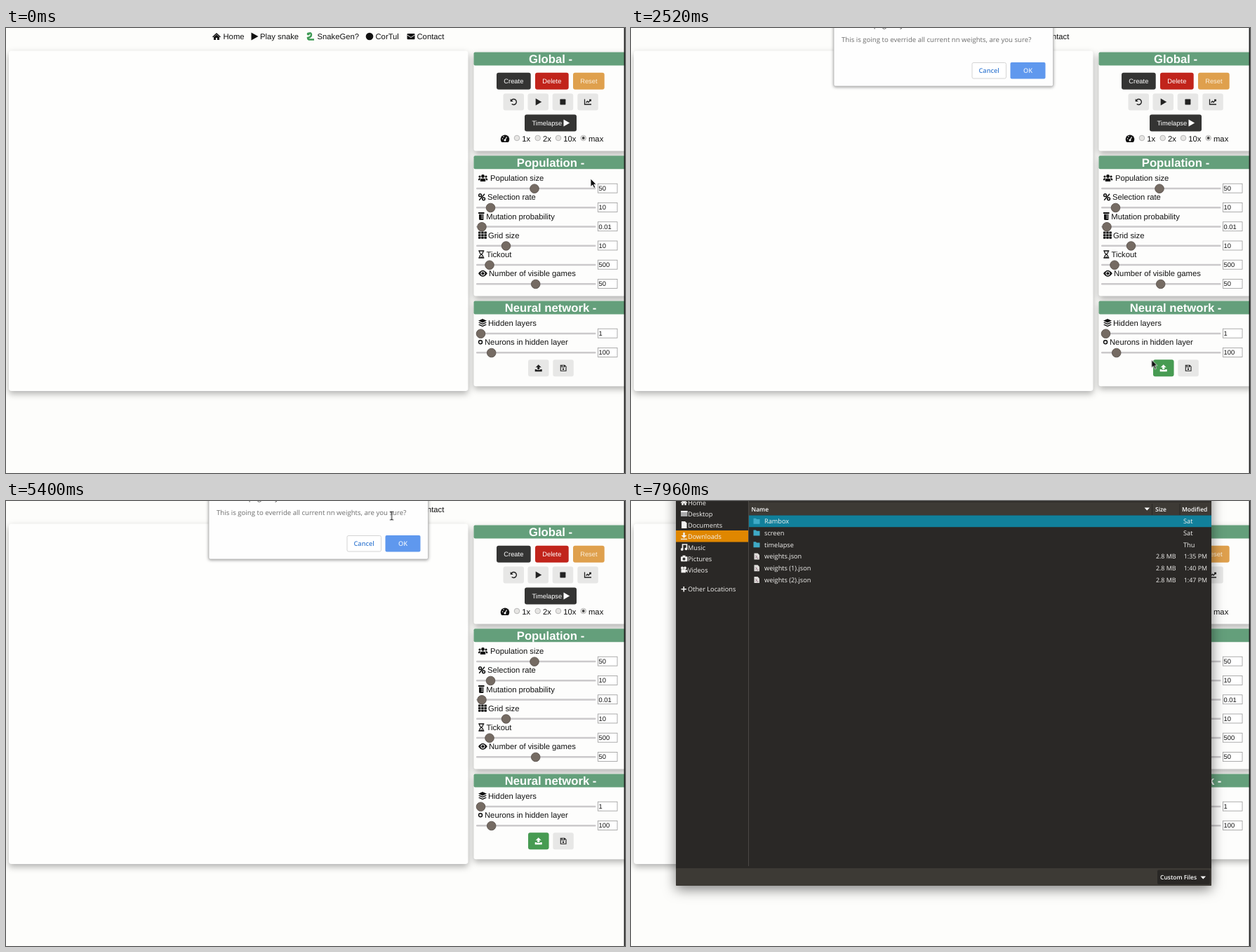
Write an HTML page that moves like this. It is 882 px wide and 635 px high and loops after 8 s.

```html
<!DOCTYPE html>
<html lang="en">
<head>
<meta charset="utf-8">
<title>Snake trainer</title>
<style>
html, body { margin: 0; width: 100%; height: 100%; overflow: hidden; background: #fdfdfb; }
svg { display: block; width: 882px; height: 635px; }
text { font: 11.25px "Liberation Sans", Arial, sans-serif; fill: #111; white-space: pre; text-rendering: geometricPrecision; }
.title { font-size: 16.7px; font-weight: bold; fill: #fff; text-anchor: middle; }
.small { font-size: 9.33px; }
.ui { font-family: "Open Sans", "Noto Sans", sans-serif; font-size: 9.2px; fill: #f3f2f0; }
.bold { font-size: 8.5px; font-weight: 600; fill: #fff; }
.mid { text-anchor: middle; }
.end { text-anchor: end; }
.panel { filter: drop-shadow(0 4px 5px rgba(0,0,0,.3)); }
#files { filter: drop-shadow(0 5px 9px rgba(0,0,0,.5)); }
</style>
</head>
<body>
<svg id="stage" viewBox="0 0 882 635">
  <g id="page"></g>
  <g id="hover"></g>
  <g id="confirm"></g>
  <g id="pointer">
    <path id="arrow" d="M0 0v11.5l2.8-2.5 2 4.4 2-.9-2-4.3h3.4z" fill="#111" stroke="#fff" stroke-width=".8"/>
    <path id="hand" d="M-1.5-1.5q1.4-1 2.4 0v4l5 1.1q1.3.5 1.2 2l-.7 4H-.5L-4 5q.8-1.2 2.5.2z" fill="#111" stroke="#fff" stroke-width=".8"/>
    <path id="beam" d="M-2.5-6q2 0 2.5 1.2Q.5-6 2.5-6M0-5V5M-2.5 6Q-.5 6 0 4.8.5 6 2.5 6" fill="none" stroke="#222" stroke-width="1.1"/>
  </g>
  <g id="files"></g>
  <path d="M881.3 0V635" stroke="#1c1c1c" stroke-width="1.4"/>
</svg>
<script>
const LOOP = 8000;
const $ = id => document.getElementById(id);

const rect = (x, y, w, h, fill, rx = 0, more = '') =>
  `<rect x="${x}" y="${y}" width="${w}" height="${h}" rx="${rx}" fill="${fill}" ${more}/>`;
const text = (x, y, label, cls = '', more = '') =>
  `<text x="${x}" y="${y}" class="${cls}" ${more}>${label}</text>`;
const icon = (d, fill = '#111', more = '') => `<path d="${d}" fill="${fill}" ${more}/>`;
const line = (d, stroke = '#111', width = 1.5) =>
  `<path d="${d}" fill="none" stroke="${stroke}" stroke-width="${width}"/>`;
const dot = (x, y, r, fill = '#111', more = '') =>
  `<circle cx="${x}" cy="${y}" r="${r}" fill="${fill}" ${more}/>`;
const at = (x, y, body) => `<g transform="translate(${x} ${y})">${body}</g>`;

function panel(y, h, title, titleX) {
  return `<g class="panel">${rect(666.5, y, 220, h, '#fdfdfc', 3)}</g>` +
    rect(666.5, y, 216, 19, '#649f7b', 2) + text(titleX, y + 15.2, title, 'title');
}

function slider(y, label, labelX, thumbX, value, glyph) {
  return at(673, y, glyph) + text(labelX, y + 4, label) +
    rect(670, y + 13.8, 170.5, 2.4, '#cbc9cb', 1.2) +
    dot(thumbX, y + 15.2, 6.3, '#756b63', 'stroke="#514a45" stroke-width=".8"') +
    rect(843.5, y + 8.2, 27.5, 13, '#fff', 0, 'stroke="#999" stroke-width=".8"') +
    text(844.6, y + 18, value, 'small');
}

function button(x, y, w, label, fill, color = '#fff') {
  return rect(x, y, w, 24, fill, 3) +
    text(x + w / 2, y + 15.2, label, 'small mid', `style="fill:${color}"`);
}

const iconButton = (x, y, glyph, fill = '#e7e7e6') =>
  rect(x, y, 29.5, 24, fill, 3) + at(x + 14.7, y + 12, glyph);

const upload = color => icon('M0-5L4-1H1.5v3h-3v-3H-4zM-5 1.8h2.5v1h5v-1H5V5H-5z', color);

const homeGlyph = 'M-6 .5L0-5 6 .5l-1 1-5-4.5-5 4.5zM-4 1l4-3.5L4 1v4H1V2h-2v3h-3z';

const glyphs = {
  people: dot(6.5, -2.5, 2.4) + dot(2, -2, 1.6) + dot(11, -2, 1.6) +
    icon('M2.8 5V2.5Q3 .5 6.5.5T10.2 2.5V5zM0 3.2V1.5Q1 .2 3.2.4L2 3.2zM13.2 3.2V1.5Q12.2.2 10 .4l1.2 2.8z'),
  percent: line('M1.2 4.5L9-4.5') +
    dot(2.6, -2.6, 1.9, 'none', 'stroke="#111" stroke-width="1.5"') +
    dot(7.6, 2.6, 1.9, 'none', 'stroke="#111" stroke-width="1.5"'),
  tube: icon('M0-5.5h8.5v2H0zM1-2.7h6.6V4q0 1.5-1.5 1.5H2.5Q1 5.5 1 4z') + line('M4-1.3h3.6M4 .8h3.6M4 2.9h3.6', '#fff', .7),
  grid: [0, 1, 2].flatMap(r => [0, 1, 2].map(c => rect(c * 4.2, r * 3.6 - 5.2, 3.5, 3, '#111', .4))).join(''),
  glass: line('M.3-5h8M.3 5h8') + line('M1.5-5Q1.5-1.5 4.3 0 7-1.5 7-5M1.5 5Q1.5 1.5 4.3 0 7 1.5 7 5', '#111', 1.2) + icon('M2.5 4.5q1.8-3 3.6 0z'),
  eye: icon('M0 0Q6.3-9 12.8 0 6.3 9 0 0z') + dot(6.4, 0, 3, '#fff') + dot(6.4, 0, 2),
  layers: icon('M6-6l6 2.7L6-.6 0-3.3zM0-.4l1.8-.8L6 .7l4.2-1.9 1.8.8L6 2.3zM0 2.6l1.8-.8L6 3.7l4.2-1.9 1.8.8L6 5.3z'),
  ring: dot(3, 0, 2.5, 'none', 'stroke="#111" stroke-width="1.5"')
};

function drawPage() {
  const nav = at(300, 12, icon(homeGlyph)) + text(309.5, 16, 'Home') +
    icon('M349.5 6.5l10 5.5-10 5.5z') + text(362, 16, 'Play snake') +
    line('M431 8q4-2 4 1.5T430 14q0 3 4 2.5h5', '#3f9a55', 2.5) + dot(430.7, 8.5, 2, '#3f9a55') +
    text(443.5, 16, 'SnakeGen?') +
    dot(518, 12, 5.3) + text(526.5, 16, 'CorTul') +
    rect(571.5, 8, 11, 8.3, '#111', 1) + line('M571.5 10l5.5 3.5L582.5 10', '#fff', .9) +
    text(585.5, 16, 'Contact');

  const radios = [[728, '1x'], [757.7, '2x'], [787, '10x'], [822.7, 'max']].map(([x, label]) =>
    dot(x, 157, 3.8, '#e6e5e3', 'stroke="#aaa" stroke-width=".8"') +
    (label === 'max' ? dot(x, 157, 1.9, '#444') : '') + text(x + 7.3, 161.5, label)).join('');

  const global = panel(34.5, 141, 'Global -', 776) +
    button(699, 63.7, 48.7, 'Create', '#343433') +
    button(754, 63.7, 47.7, 'Delete', '#c1241b') +
    button(808, 63.7, 44.7, 'Reset', '#dfa04d', '#fbeedb') +
    iconButton(708.5, 93.5, line('M-3-2.5A4 4 0 1 1-2.5 3', '#222', 1.4) + icon('M-4.5-4.5v4h4z', '#222')) +
    iconButton(743.5, 93.5, icon('M-3.5-5L5 0-3.5 5z', '#222')) +
    iconButton(778.7, 93.5, rect(-4, -4, 8, 8, '#222', .7)) +
    iconButton(814.3, 93.5, line('M-4.5-4V3.5H5M-2.5 1L-.5-1 1 .5 4-2.7M2-3h2.3v2', '#222', 1.3)) +
    rect(739, 123.5, 74, 24, '#343433', 3) + text(749.5, 138.7, 'Timelapse', 'small', 'style="fill:#fff"') +
    icon('M794.5 130.5l8.7 5-8.7 5z', '#fff') +
    icon('M706.3 163A6.3 6.3 0 1 1 715.7 163z') + line('M711 160l2.5-4.5', '#fff', 1.2) +
    dot(711, 160, 1.5, '#fff') + dot(707.5, 158, .8, '#fff') + dot(709, 155, .8, '#fff') + radios;

  const rows = [
    ['Population size', 690, 753, '50', 'people'],
    ['Selection rate', 686, 690.5, '10', 'percent'],
    ['Mutation probability', 684.3, 678, '0.01', 'tube'],
    ['Grid size', 687, 712.5, '10', 'grid'],
    ['Tickout', 684.5, 689, '500', 'glass'],
    ['Number of visible games', 688, 754.7, '50', 'eye']
  ];
  const population = panel(182.3, 200.2, 'Population -', 776) +
    rows.map(([label, x, thumb, value, g], i) => slider(214 + 27.25 * i, label, x, thumb, value, glyphs[g])).join('');

  const network = panel(389.6, 121.7, 'Neural network -', 776) +
    slider(421, 'Hidden layers', 687, 676.5, '1', glyphs.layers) +
    slider(448.3, 'Neurons in hidden layer', 682, 691.7, '100', glyphs.ring) +
    iconButton(744, 473.3, upload('#222')) +
    iconButton(779.3, 473.3, line('M-3.7-4H2L4-2V4H-3.7zM-2-4v2.5h3.5V-4', '#222', 1.1) + dot(0, 1.5, 1.2, '#222'));

  $('page').innerHTML = rect(0, 0, 882, 635, '#fdfdfb') + nav +
    `<g class="panel">${rect(4, 32.5, 654.5, 485.5, '#fefefd', 4)}</g>` + global + population + network;
  $('hover').innerHTML = iconButton(744, 473.3, upload('#fff'), '#479b52');
}

function drawConfirm() {
  $('confirm').innerHTML =
    `<g style="filter:drop-shadow(0 1px 2px rgba(0,0,0,.4))">${rect(289, -50, 312.5, 133, '#fefefe', 2, 'stroke="#bbb" stroke-width=".8"')}</g>` +
    text(300, -1, 'This web page says', 'ui', 'style="fill:#333;font-size:10.5px"') +
    text(300, 19.5, 'This is going to everride all current nn weights, are you sure?', 'ui', 'style="fill:#6d6d6d;font-size:9.65px"') +
    rect(486, 49.5, 48.5, 22.5, '#fff', 2, 'stroke="#d4d4d4" stroke-width="1"') +
    text(510.2, 63.8, 'Cancel', 'ui mid', 'style="fill:#3d7fd3;font-weight:600"') +
    rect(540.5, 49, 50, 23.5, '#5f98ee', 2) +
    text(565.5, 63.8, 'OK', 'ui mid', 'style="fill:#e3edfc;font-weight:600"');
}

function drawFiles() {
  const white = '#f3f2f0';
  const places = [
    ['Recent', dot(0, 0, 3.7, 'none', `stroke="${white}" stroke-width="1.3"`) + line('M0-2V.5H2', white, 1)],
    ['Home', `<g transform="scale(.8)">${icon(homeGlyph, white)}</g>`],
    ['Desktop', rect(-4.5, -4, 9.5, 8, '#aaa') + rect(-4.5, -4, 9.5, 2, white)],
    ['Documents', icon('M-3.5-5H1.5L4-2.5V5h-7.5z', white)],
    ['Downloads', icon('M-1.2-5h2.4v4H4L0 3-4-1h2.8zM-4.5 3.7h9V5h-9z', white)],
    ['Music', line('M-2 3V-4H4V2', white, 1.7) + dot(-2.8, 3, 1.9, white) + dot(3, 2.3, 1.9, white)],
    ['Pictures', rect(-4.5, -2.8, 9.5, 7, white, 1) + rect(-2, -4.3, 4, 2, white) + dot(0, .7, 2, '#333')],
    ['Videos', dot(-2.5, -2.5, 2, white) + dot(1.5, -2.5, 2, white) + rect(-4, -.7, 6.5, 5, white) + icon('M2 1.5L5-.5v5z', white)]
  ];
  const entries = [
    ['Rambox', '', 'Sat'], ['screen', '', 'Sat'], ['timelapse', '', 'Thu'],
    ['weights.json', '2.8 MB', '1:35 PM'], ['weights (1).json', '2.8 MB', '1:40 PM'], ['weights (2).json', '2.8 MB', '1:47 PM']
  ];
  const folder = icon('M-4.5-4H-1l1 1.2h4.5V4h-9z', '#3faac6');
  const sheet = icon('M-3.5-4.5H1.5l2.5 2.5v6.5h-7.5z', '#deddda') + line('M-1.5-1l2 1.5-2 1.5M.5 2.5h2', '#8a5d75', .9);
  const bar = '#3d3a35';

  $('files').innerHTML = rect(64, -49.5, 763, 598.5, '#2a2826', 2) +
    rect(64, -49.5, 763, 24, bar, 2) +
    text(94, -33.8, 'Cancel', 'ui bold mid') + text(445, -33.8, 'Open File', 'ui bold mid') +
    text(796, -33.8, 'Open', 'ui bold mid') +
    dot(759.5, -38, 2.8, 'none', 'stroke="#fff" stroke-width="1.2"') + line('M761.5-36l3 3', '#fff') +
    rect(168, -25.5, 659, 27.5, '#302e2b') +
    icon('M182-15v6l-3.5-3zM314-15v6l3.5-3z', white) +
    at(197.5, -12, `<g transform="scale(.7)">${icon(homeGlyph, white)}</g>`) +
    text(204, -8.7, 'tavolendi/', 'ui bold') + text(252.5, -8.7, 'Downloads', 'ui bold') +
    rect(168, 2, 659, 18.5, bar) +
    text(171.5, 14.5, 'Name', 'ui bold') + text(747, 14.5, 'Size', 'ui bold') + text(785, 14.5, 'Modified', 'ui bold') +
    icon('M731.5 9.5h7.5l-3.75 4z', '#fff') + line('M742.5 4V20M782 4V20', '#2a2826', 1) +
    rect(168, 20.5, 659, 16.7, '#11809b') +
    line('M167.5-25V521', '#4b4845', 1) +
    `<g id="place">${rect(64, 42, 103, 16.5, '#e08700')}</g>` +
    places.map(([label, glyph], i) => {
      const y = -14 + 16 * i;
      return at(75.5, y, glyph) + text(81, y + 3.5, label, 'ui');
    }).join('') +
    line('M71.5 125.7h7.5M75.25 122v7.5', white, 1.6) + text(81, 129.2, 'Other Locations', 'ui') +
    entries.map(([name, size, date], i) => {
      const y = 28.8 + 16.75 * i;
      return at(179, y, size ? sheet : folder) + text(190, y + 3.4, name, 'ui') +
        text(776.5, y + 3.4, size, 'ui end', 'style="font-size:8.9px"') +
        (size ? text(821, y + 3.4, date, 'ui end', 'style="font-size:8.9px"') : text(787, y + 3.4, date, 'ui'));
    }).join('') +
    rect(64, 524, 763, 25, bar, 1) + rect(750, 526.5, 75, 20.5, '#292725', 2) +
    text(754, 540.3, 'Custom Files', 'ui bold') + icon('M811.5 535.5h7.5l-3.75 4z', '#fff');
}

function play(id, steps) {
  const first = steps[0][1], last = steps[steps.length - 1][1];
  const frames = [[0, first], ...steps, [LOOP, last]]
    .map(([t, style, easing = 'linear']) => ({ offset: t / LOOP, easing, ...style }));
  $(id).animate(frames, { duration: LOOP, iterations: Infinity }).startTime = 0;
}

// Visible only inside the given [from, to) spans.
function showDuring(id, ...spans) {
  const off = { opacity: 0 }, on = { opacity: 1 };
  const steps = spans.flatMap(([from, to]) => [[from, off], [from, on], [to, on], [to, off]]);
  play(id, spans[0][0] === 0 ? steps.slice(1) : steps);
}

drawPage();
drawConfirm();
drawFiles();

const move = (t, x, y) => [t, { transform: `translate(${x}px, ${y}px)` }, 'ease-in-out'];
play('pointer', [
  move(0, 833, 215), move(920, 838.5, 371), move(1720, 754, 486.5), move(2440, 754, 486.5),
  move(3120, 316, 22), move(3480, 316, 22), move(5400, 549.5, 21), move(5840, 566, 60)
]);
showDuring('arrow', [0, 1680], [2480, 3000], [5560, 6360]);
showDuring('hand', [1680, 2480]);
showDuring('beam', [3000, 5560]);

play('hover', [
  [1660, { opacity: 0 }], [1840, { opacity: 1 }],
  [6380, { opacity: 1 }], [6560, { opacity: 0 }]
]);

const slide = (t, y, opacity) => [t, { transform: `translateY(${y}px)`, opacity }];
play('confirm', [slide(2240, -24, 0), slide(2400, 0, 1), slide(6400, 0, 1), slide(6480, -9.5, .94), slide(6600, -24, 0)]);

$('files').style.transformOrigin = '0 253px';
play('files', [
  [6360, { transform: 'scaleY(0)', opacity: 0 }, 'cubic-bezier(.33,.65,.67,1)'],
  [6600, { transform: 'scaleY(1)', opacity: 1 }]
]);
showDuring('place', [6760, LOOP]);
</script>
</body>
</html>
```
